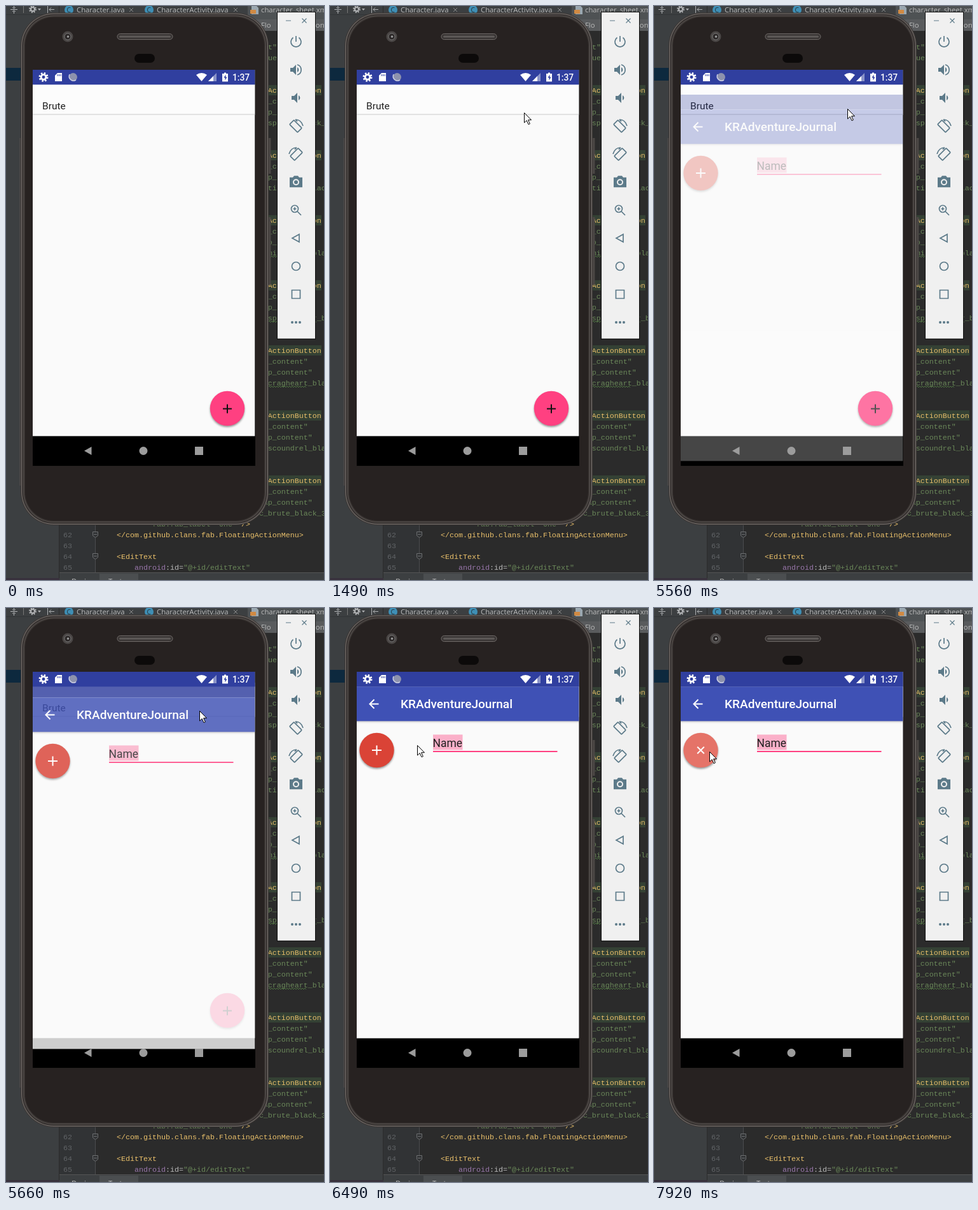
These frames come from a looping animation (500 by 900 pixels, 8000 ms). An HTML page:

```html
<!DOCTYPE html>
<html lang="en">
<head>
<meta charset="utf-8">
<style>
html, body { margin: 0; width: 500px; height: 900px; overflow: hidden; background: #2b2b2b; }
svg { display: block; }
text { white-space: pre; font-family: Roboto, sans-serif; }
.code { font: 11.667px "Liberation Mono", monospace; fill: #6a8759; }
.ui { font: 11.3px "Open Sans", sans-serif; fill: #bbb; }
.tag { fill: #e8bf6a; }
.ns { fill: #9876aa; }
.attr { fill: #bababa; }
.num { fill: #606366; }
.fab { filter: drop-shadow(0 2px 1.5px #0006); }
.line { fill: none; stroke: #5c7a89; stroke-width: 1.7; }
.solid { fill: #5c7a89; }
</style>
</head>
<body>
<svg id="stage" width="500" height="900" viewBox="0 0 500 900"></svg>
<script>
const rect = (x, y, w, h, fill, more = '') =>
  `<rect x="${x}" y="${y}" width="${w}" height="${h}" fill="${fill}" ${more}/>`;
const circle = (x, y, r, fill, more = '') =>
  `<circle cx="${x}" cy="${y}" r="${r}" fill="${fill}" ${more}/>`;
const path = (d, more = '') => `<path d="${d}" ${more}/>`;
const text = (x, y, s, more = '') => `<text x="${x}" y="${y}" ${more}>${s}</text>`;
const esc = s => s.replace(/</g, '&lt;').replace(/>/g, '&gt;');
const code = (x, mid, s, cls = '') => text(x, mid + 4, esc(s), `class="code ${cls}"`);
const at = (x, y, body) => `<g transform="translate(${x} ${y})">${body}</g>`;
const line = d => path(d, 'class="line"');
const solid = d => path(d, 'class="solid"');
const gear = (x, y, r, fill, hole) =>
  circle(x, y, r * .7, fill) +
  circle(x, y, r * .8, 'none', `stroke="${fill}" stroke-width="${r * .4}" stroke-dasharray="${r * .314}"`) +
  circle(x, y, r * .32, hole);

function editor() {
  let s = rect(0, 0, 84, 900, '#3c3f41') + rect(84, 0, 57, 900, '#313335') +
    rect(83, 0, 1, 900, '#2b2b2b') + rect(140, 14, 1, 876, '#4b4d4f') +
    rect(0, 97, 30, 20, '#0d293e') +
    rect(0, 0, 500, 21, '#3c3f41') + rect(380, 0, 120, 21, '#4e5254') +
    rect(83, 0, 1, 14, '#2b2b2b') + rect(0, 13, 84, 1, '#323537') +
    rect(380, 21, 120, 18, '#595b5d');

  // toolbar and file tabs
  s += path('M7 5.500h11M12.500 0v3M12.500 8v4M10 2l2.500 2 2.500-2M10 9l2.500-2 2.500 2', 'stroke="#afb1b3" fill="none"') +
    rect(27, 0, 1, 11, '#777') + gear(42, 5, 6, '#afb1b3', '#3c3f41') +
    path('M50 4h5l-2.500 3z', 'fill="#afb1b3"') +
    path('M65.500 0v11M68 5.500h8M71 2.500l-3 3 3 3', 'stroke="#afb1b3" fill="none"');
  for (const [x, name, close] of [[99, 'Character.java', 197], [225, 'CharacterActivity.java', 361]])
    s += circle(x, 6, 7, '#3f8fb5') + text(x - 3.5, 10, 'C', 'class="ui" style="font-size:10px;fill:#263238"') +
      text(x + 12, 10, name, 'class="ui"') +
      path(`M${close - 3} 3l6 6m0-6l-6 6`, 'stroke="#888"');
  s += path('M386 0h8l3 3v10h-11z', 'fill="#9aa7b0"') + rect(384, 6, 9, 6, '#d08a43') +
    text(401, 10, 'character_sheet.xml', 'class="ui"') +
    text(398, 34, '.Flo', 'class="ui"') + text(484, 34, 'ion', 'class="ui"') +
    code(412, 64, 't"') + code(412, 81, 'ue"');

  ['sprite', 'tinkerer', 'mindthief', 'spellweaver', 'cragheart', 'scoundrel', 'brute'].forEach((name, i) => {
    const y = 132 + i * 102;
    s += rect(202, y - 8, 294, 16, '#344134') +
      code(202, y, '<com.github.clans.fab.FloatingActionButton', 'tag') +
      code(230, y + 17, 'android:layout_width="wrap_content"') +
      code(230, y + 34, 'android:layout_height="wrap_content"') +
      code(230, y + 51, `android:src="@drawable/ic_${name}_black_36dp"`) +
      code(230, y + 68, 'fab:fab_label="One"') + code(370, y + 68, '/>', 'tag');
    if (i > 1 && i < 5)
      s += path(`M412 ${y + 58}` + 'l2-2 2 2'.repeat(name.length * 7 / 4 | 0), 'fill="none" stroke="#5b8a4a" stroke-width=".8"');
  });

  s += code(174, 829, '</com.github.clans.fab.FloatingActionMenu>', 'tag') +
    code(174, 863, '<EditText', 'tag') +
    code(202, 880, 'android', 'ns') + code(251, 880, ':id=', 'attr') + code(279, 880, '"@+id/editText"');
  [62, 63, 64, 65].forEach((n, i) => s += code(90, 829 + i * 17, String(n), 'num'));
  for (const y of [829, 863])
    s += path(`M136.500 ${y - 4.5}h8v6l-4 3-4-3zM138 ${y - .5}h5`, 'fill="#313335" stroke="#6c6e70"');

  return s + rect(84, 888, 416, 12, '#3c3f41') + rect(84, 888, 416, 1, '#555') +
    rect(147, 890, 61, 10, '#4b4e50') +
    text(103, 906, 'Design', 'class="ui"') + text(161, 906, 'Text', 'class="ui"') +
    rect(0, 897, 84, 3, '#38303c');
}

function phone() {
  const rim = ['#3a3533', '#6f6a67', '#4b4644', '#2a2524', '#544f4c', '#443f3d', '#36312f', '#272221'];
  return rect(412, 207, 4.5, 56, '#4a4644') + rect(412, 331, 4.5, 106, '#4a4644') +
    rect(21.5, 207, 2, 545, '#4f4b4a') +
    rim.map((fill, i) => rect(23 + i, 10.5 + i, 390 - 2 * i, 803.5 - 2 * i, fill, `rx="${52 - i}"`)).join('') +
    circle(97, 48, 8.5, '#4b4746') + circle(97, 48, 5, '#2a2626', 'stroke="#777"') + circle(97.500, 48, 1.8, '#999') +
    rect(175, 43.5, 87, 9, '#393534', 'rx="4.500" stroke="#706b69"') + rect(178, 46.5, 81, 3, '#5f5b59', 'rx="1.500"') +
    rect(202, 75, 32, 14, '#0c0a0a', 'rx="7"');
}

const fab = (x, y, r, fill, id) => circle(x, y, r, fill, `class="fab" id="${id}"`);

function listScreen() {
  return rect(42, 100, 350, 621, '#000') +
    rect(42, 100, 349.3, 574.4, '#fafafa') + rect(42, 123, 349.3, 46, '#fcfcfc') +
    rect(42, 169, 349.3, 2, '#e2e2e2') +
    text(57, 161.500, 'Brute', 'font-size="15.500" fill="#212121"') +
    fab(348, 631, 27.2, '#ff4081', 'add') +
    path('M341 631.500h14M348 624.500v14', 'stroke="#111" stroke-width="2"');
}

function formScreen() {
  return rect(42, 100, 349.3, 574.4, '#fafafa') +
    rect(42, 177, 349.3, 1.5, '#000', 'opacity=".2"') + rect(42, 178.500, 349.3, 2, '#000', 'opacity=".06"') +
    rect(42, 100, 349.3, 23.3, '#303f9f') + rect(42, 123.3, 349.3, 54, '#3f51b5') +
    path('M76.500 150.500h-14M69.500 143.500l-7 7 7 7', 'stroke="#fff" stroke-width="2" fill="none"') +
    text(111, 157, 'KRAdventureJournal', 'font-size="19.100" font-weight="500" fill="#fff"') +
    rect(162, 198.500, 46.500, 24, '#fbb0c9') +
    text(161.500, 217.500, 'Name', 'font-size="17.450" fill="#212121"') +
    rect(162, 224, 195.500, 2, '#ff4081') +
    fab(73.5, 223, 27.2, '#da4336', 'menu') +
    path('M-7.500 0h15M0 -7.500v15', 'id="plus" stroke="#fff" stroke-width="2"');
}

function bars() {
  return rect(42, 100, 349.3, 23.3, '#303f9f') +
    gear(59, 111.500, 7.5, '#fff', '#303f9f') +
    path('M81 105h7v13h-11v-9z', 'fill="#fff"') +
    path('M81 107v3M83.500 107v3M86 107v3', 'stroke="#303f9f"') +
    circle(105.500, 111.500, 6.5, '#8d92ad') +
    path('M100 107a7 7 0 0 0 10 9', 'fill="none" stroke="#c9cde4" stroke-width="1.500"') +
    path('M299 108q8.500-6 17 0l-8.500 10z', 'fill="#fff"') +
    path('M331 105v13h-13z', 'fill="#8b94c9"') + path('M326 110v8h-8z', 'fill="#fff"') +
    path('M343 104.500h3v1.500h3v12.500h-9v-12.500h3z', 'fill="#fff"') +
    path('M345.500 107.500l-3 5h2v4l3-5h-2z', 'fill="#303f9f"') +
    text(356, 116.500, '1:37', 'font-size="13.800" font-weight="500" fill="#fff"') +
    path('M123 697.500l11.500-6.500v13z', 'fill="#9c9c9c"') + circle(216, 697.500, 6.5, '#9c9c9c') +
    rect(297, 691, 13, 13, '#9c9c9c');
}

function panel() {
  const rotate = rect(-4.8, -8.8, 9.6, 17.6, 'none', 'class="line" rx="1" transform="translate(-.5 .5) rotate(-45)"') +
    line('M-1 -10q9 0 12 10M-1 -10l3 3');
  const speaker = solid('M-9 -3h4l5-5v16l-5-5h-4z');
  const icons = [
    line('M0 -9v9M-4.500 -6.500a8 8 0 1 0 9 0'),
    speaker + solid('M2 -4a4.500 4.500 0 0 1 0 8z') + line('M2 -8a8.300 8.300 0 0 1 0 16'),
    at(2, 0, speaker + solid('M2 -4a4.500 4.500 0 0 1 0 8z')),
    rotate,
    `<g transform="scale(-1 1)">${rotate}</g>`,
    at(0, -.7, solid('M-10 -6.500h5l2-2.500h6l2 2.500h5v15.500h-20z') +
      circle(0, 1, 4, 'none', 'stroke="#f0f0f0" stroke-width="2"')),
    circle(-2, -2, 5.5, 'none', 'class="line"') + line('M2 2l6 6M-4.500 -2h5M-2 -4.500v5'),
    line('M-6 0l11-6v12z'),
    circle(0, 0, 6.5, 'none', 'class="line"'),
    line('M-6.500 -6.500h13v13h-13z'),
    [-6, 0, 6].map(x => circle(x, 0, 2, '#5c7a89')).join('')
  ];
  return rect(426, 9, 61, 514, '#111') + rect(427, 10, 59, 511.5, '#f0f0f0') +
    path('M440 23h8M465.500 19.500l7 7m0-7l-7 7', 'stroke="#607d8b" stroke-width="1.200"') +
    icons.map((icon, i) => at(456, 56 + i * 44, icon)).join('');
}

stage.innerHTML = editor() + phone() + listScreen() + `<g id="form">${formScreen()}</g>` + bars() + panel() +
  path('M.5 .5v15.500l3.700-3.500 2.800 6.200 2.300-1-2.700-6h4.900z', 'id="cursor" fill="#fff" stroke="#000"');

const [form, plus, menu, cursor] = ['form', 'plus', 'menu', 'cursor'].map(id => document.getElementById(id));

// time, x, y of the pointer tip
const route = [
  [300, 385, 855], [420, 364, 640], [540, 338, 430], [660, 320, 295], [770, 316, 237], [890, 319, 220],
  [1140, 319, 220], [1300, 313, 195], [1450, 306, 169], [1600, 304, 161],
  [5930, 304, 161], [6050, 275, 172], [6250, 200, 197], [6490, 137, 215], [6680, 115, 222],
  [6850, 98, 222], [7010, 87, 225], [8000, 87, 225]
];
// time, offset, opacity of the opening form
const opening = [[0, 0, 0], [5560, 39, .28], [5660, 17, .82], [5890, 1, 1], [5960, 0, 1]];
// time, colour, angle of the menu button
const press = [[0, '#da4336', 0], [7390, '#e05a4e', 0], [7620, '#e87b71', 0], [7780, '#e9857c', -20], [7920, '#e57368', -45]];

const held = (keys, t) => keys.findLast(k => k[0] <= t);

function pointer(t) {
  const i = Math.max(1, route.findIndex(k => k[0] > t));
  const [a, b] = [route[i - 1], route[i]];
  const u = (t - a[0]) / (b[0] - a[0]);
  return [1, 2].map(n => Math.round(a[n] + (b[n] - a[n]) * u));
}

function draw() {
  const t = performance.now() % 8000;
  const [, shift, opacity] = held(opening, t);
  const [, colour, angle] = held(press, t);
  form.setAttribute('transform', `translate(0 ${shift})`);
  form.setAttribute('opacity', opacity);
  menu.setAttribute('fill', colour);
  plus.setAttribute('transform', `translate(73.5 223) rotate(${angle})`);
  cursor.setAttribute('visibility', t < 300 ? 'hidden' : 'visible');
  cursor.setAttribute('transform', `translate(${pointer(t).join(' ')})`);
  requestAnimationFrame(draw);
}
draw();
</script>
</body>
</html>
```
